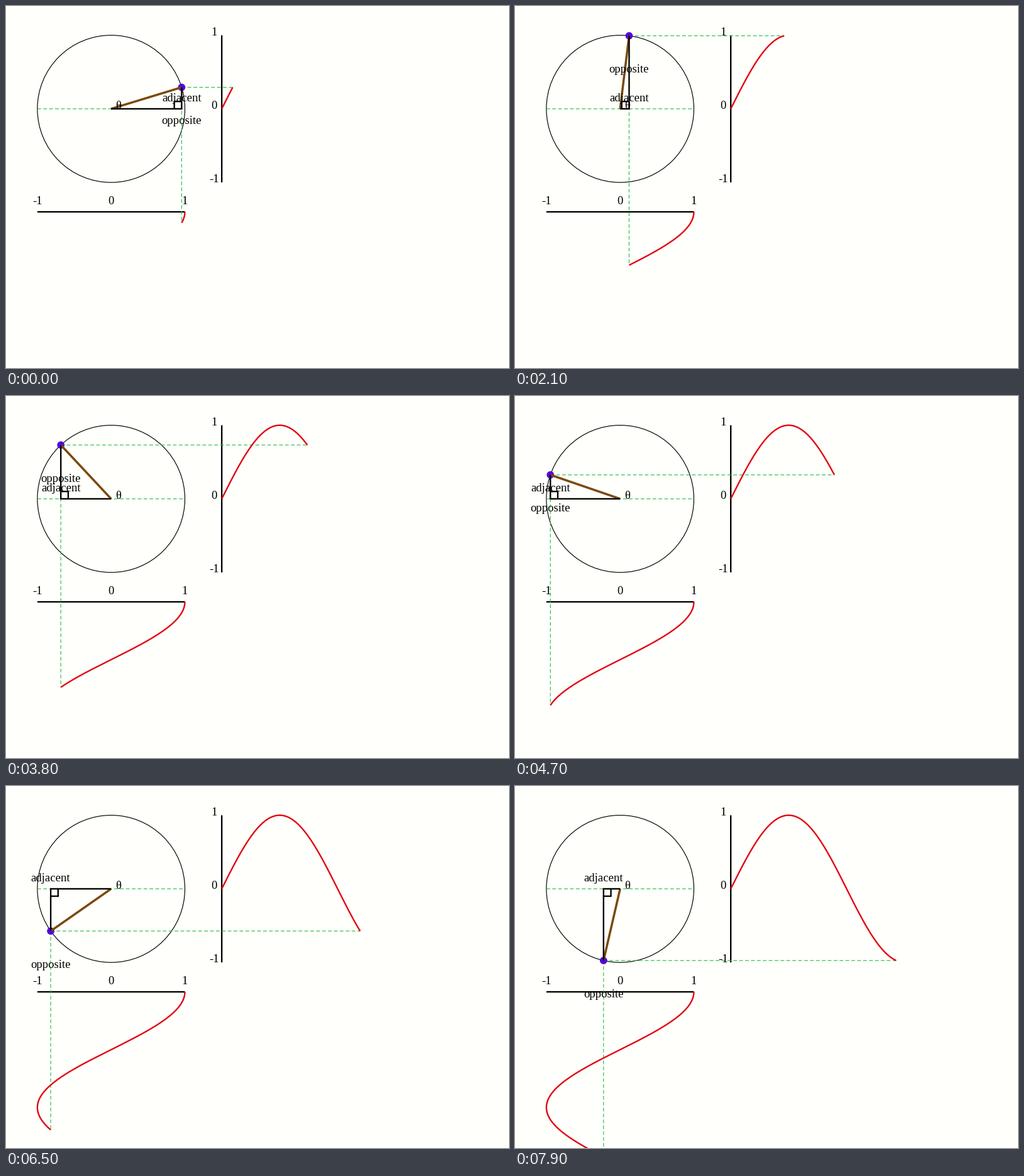
These frames come from a looping animation (800 px wide and 577 px high, 8000 ms). A matplotlib script:

```python
import numpy as np
import matplotlib.pyplot as plt
from matplotlib.animation import FuncAnimation
from matplotlib.patches import Circle

W, H = 800, 577
DPI = 64
PT = 72 / DPI            # points per pixel
U = 800 / 682            # drawing unit in pixels
R = 100 * U
CX, CY = 167.2, 163.9    # circle centre
AX, AY = CX + 150 * U, CY + 140 * U   # x of the sine axis, y of the cosine axis
FRAMES = 80

BG, INK = "#fffffc", "#000000"
GREEN, RED, BROWN, BLUE = "#2dbd4b", "#e1000f", "#7a4a0c", "#5305e0"

plt.rcParams.update({
    "path.snap": False,
    "lines.scale_dashes": False,
    "lines.dash_capstyle": "butt",
    "lines.solid_capstyle": "butt",
    "lines.solid_joinstyle": "miter",
    "font.family": "Liberation Serif",
    "font.size": 16 * U * PT,
})

fig = plt.figure(figsize=(W / DPI, H / DPI), dpi=DPI, facecolor=BG)
ax = fig.add_axes([0, 0, 1, 1])
ax.set_xlim(0, W)
ax.set_ylim(H, 0)
ax.axis("off")


def line(color, width, z, xs=(), ys=(), dashed=False):
    style = (0, (5 * U * PT, 3 * U * PT)) if dashed else "-"
    return ax.plot(xs, ys, color=color, lw=width * U * PT, ls=style, zorder=z)[0]


def label(text, x=0, y=0):
    return ax.text(x, y, text, color=INK, ha="center", va="baseline", zorder=8)


# Fixed parts
ax.add_patch(Circle((CX, CY), R, fill=False, ec=INK, lw=U * PT, zorder=1))
line(GREEN, 1, 2, (CX - R, CX + R), (CY, CY), dashed=True)
line(INK, 2, 3, (AX, AX), (CY - R, CY + R))
line(INK, 2, 3, (CX - R, CX + R), (AY, AY))
for v in (-1, 0, 1):
    label(str(v), AX - 10 * U, CY - v * R)
    label(str(v), CX + v * R, AY - 10 * U)
label("θ", CX + 10 * U, CY)

# Moving parts
across = line(GREEN, 1, 3.5, dashed=True)
down = line(GREEN, 1, 3.5, dashed=True)
dot = ax.add_patch(Circle((CX, CY), 5 * U, fc=BLUE, ec="none", zorder=4))
hyp = line(BROWN, 3, 5)
legs = line(INK, 2, 6)
corner = line(INK, 2, 6)
sine = line(RED, 2, 7)
cosine = line(RED, 2, 7)
adjacent = label("adjacent")
opposite = label("opposite")


def angle(k):
    """Steps of two degrees, one and two of them in turn."""
    steps = (3 * k + 3) // 2 if k else 0
    return np.radians(17 + 2 * steps)


def update(k):
    t = angle(k)
    c, s = np.cos(t), np.sin(t)
    x, y = CX + R * c, CY - R * s
    reach = R / 2 * t

    dot.center = (x, y)
    hyp.set_data((CX, x), (CY, y))
    legs.set_data((CX, x, x), (CY, CY, y))
    qx = x - np.sign(c) * 10 * U
    qy = CY - np.sign(s) * 10 * U
    corner.set_data((qx, qx, x), (CY, qy, qy))

    across.set_data((x, AX + reach), (y, y))
    down.set_data((x, x), (y, AY + reach))

    ts = np.linspace(0, t, 160)
    sine.set_data(AX + R / 2 * ts, CY - R * np.sin(ts))
    cosine.set_data(CX + R * np.cos(ts), AY + R / 2 * ts)

    adjacent.set_position((x, CY - 10 * U))
    opposite.set_position((x, y + R / 2))
    return across, down, dot, hyp, legs, corner, sine, cosine, adjacent, opposite


anim = FuncAnimation(fig, update, frames=FRAMES, interval=100,
                     repeat=True, repeat_delay=0, blit=False)
plt.show()
```
